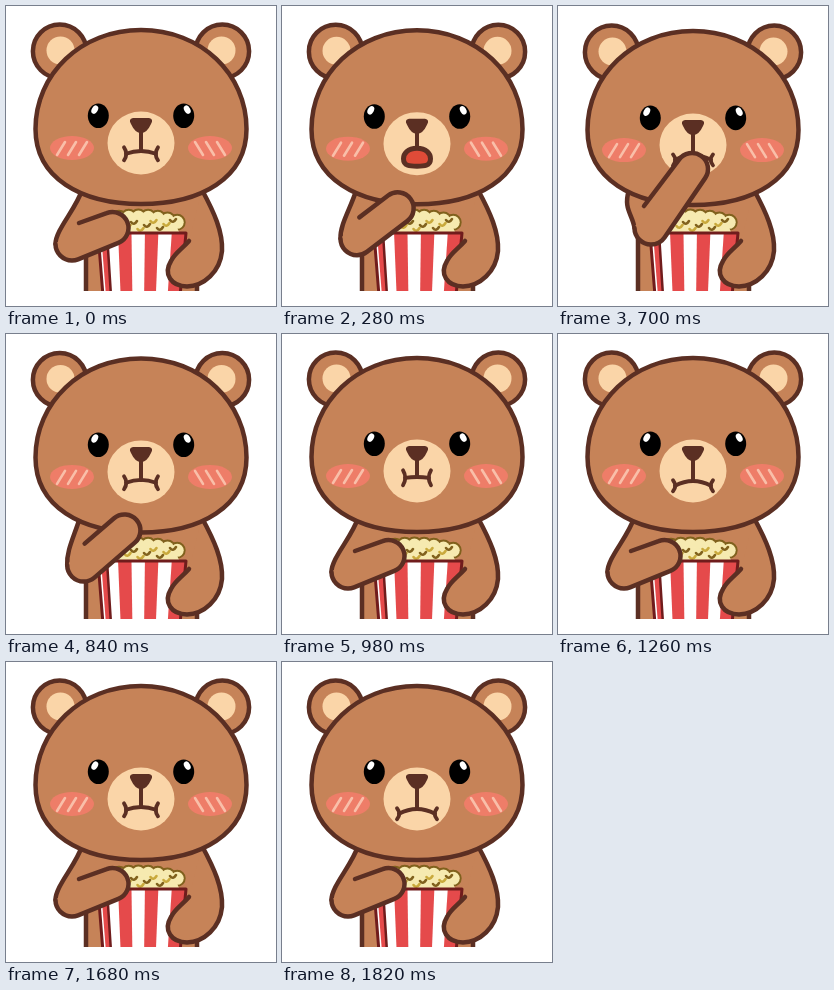
These frames come from a looping animation (270 by 300 pixels, 1960 ms). An HTML page with a canvas:

```html
<!DOCTYPE html>
<html lang="en">
<head>
<meta charset="utf-8">
<title>Bear eating popcorn</title>
<style>
html, body { margin: 0; width: 100%; height: 100%; overflow: hidden; background: #fff; }
canvas { display: block; width: 270px; height: 300px; }
</style>
</head>
<body>
<canvas id="stage"></canvas>
<script>
const canvas = document.getElementById('stage');
const ctx = canvas.getContext('2d');
const ratio = window.devicePixelRatio || 1;
canvas.width = 270 * ratio;
canvas.height = 300 * ratio;

const STEP = 140, STEPS = 14;
const FUR = '#c68358', LINE = '#5b2f23', CREAM = '#fad5a8', RED = '#e54a4b', MAROON = '#701c1c';

const lerp = (a, b, k) => a + (b - a) * k;
const clamp = (v, lo, hi) => Math.min(hi, Math.max(lo, v));

function paint(path, fill, stroke, width = 4.5) {
  if (fill) { ctx.fillStyle = fill; ctx.fill(path); }
  if (stroke) { ctx.strokeStyle = stroke; ctx.lineWidth = width; ctx.stroke(path); }
}
const shape = (d, fill, stroke, width) => paint(new Path2D(d), fill, stroke, width);

function oval(x, y, rx, ry, fill, stroke, width, turn = 0) {
  const path = new Path2D();
  path.ellipse(x, y, rx, ry, turn, 0, Math.PI * 2);
  paint(path, fill, stroke, width);
}

function mirrored(draw) {
  draw();
  ctx.save();
  ctx.translate(270, 0);
  ctx.scale(-1, 1);
  draw();
  ctx.restore();
}

// Raise and lower the hand, open wide, then chew; the eyes close once.
function pose(step) {
  return {
    lift: step < 6 ? clamp(step - 1, 0, 3) : step === 6 ? 1.3 : 0,
    gape: step < 5 ? Math.min(step, 3) : 0,
    chew: Math.sin(step * Math.PI / 2),
    shut: step === 10 || step === 11
  };
}

function drawBody() {
  shape('M76 180 L80 290 L191 290 L196 180 Z', FUR);
  shape('M80 225 L80 290 M191 262 L191 290', null, LINE);
}

function drawPopcorn() {
  const kernels = Array.from({ length: 7 }, (_, i) => {
    const x = 113 + i * 9.7;
    return [x, 211 + ((x - 132) / 17) ** 2];
  });
  for (const [x, y] of kernels) oval(x, y, 6.5, 6.5, '#f6eab0', '#80611d', 4);
  for (const [x, y] of kernels) oval(x, y, 6.5, 6.5, '#f6eab0');
  shape('M110 213 L168 215 L174 228 L106 228 Z', '#f6eab0');
  for (let i = 0; i < 9; i++) {
    const x = 115 + i * 6.5, y = 213 + (i * 7) % 11;
    shape(`M${x - 3} ${y} q3 4 6 -1`, null, i % 2 ? '#c9a93c' : '#80611d', 2.6);
  }
}

function drawBucket() {
  drawPopcorn();
  const stripe = (a, b) => shape(`M${101 + 79 * a} 227 L${101 + 79 * b} 227 L${105 + 69 * b} 290 L${105 + 69 * a} 290 Z`, RED);
  shape('M92 227 L180 227 L174 290 L97 290 Z', '#fff');
  shape('M95 227 L101 227 L105 290 L100 290 Z', RED);
  for (let i = 0; i < 3; i++) stripe(0.14 + i * 0.34, 0.31 + i * 0.34);
  shape('M101 227 L105 290', null, MAROON, 2.5);
  shape('M92 227 L180 227 L174 290 L97 290 Z', null, MAROON, 3);
}

function drawRightArm() {
  shape('M196 184 C208 206 217 226 216 245 C214 266 198 280 181 280.5 C165 280 157 268 165 255 C169 247 175 244 183 235', FUR, LINE);
}

// Upper arm goes behind the head, forearm in front of it.
function drawLeftArm(lift, front) {
  const k = lift / 3, r = 16.5;
  const elbow = { x: lerp(66, 93, k), y: lerp(238, 222, k) };
  const hand = { x: lerp(106.5, 134, k), y: lerp(222, 163, k) };
  const angle = Math.atan2(hand.y - elbow.y, hand.x - elbow.x), side = Math.PI / 2;
  const path = new Path2D();
  if (front) {
    path.arc(elbow.x, elbow.y, r, Math.PI, angle + side, true);
    path.arc(hand.x, hand.y, r - 0.5, angle + side, angle - side, true);
    path.lineTo(lerp(73, 86, k), lerp(217, 200, k));
  } else {
    const x = lerp(76, 71, k), left = elbow.x - r;
    path.moveTo(x, 184);
    path.bezierCurveTo(x - 6, 203, left - 2 * k, elbow.y - 14, left, elbow.y);
    path.lineTo(elbow.x, elbow.y);
    path.lineTo(100, 184);
    paint(path, FUR);
    const outer = new Path2D();
    outer.moveTo(x, 184);
    outer.bezierCurveTo(x - 6, 203, left - 2 * k, elbow.y - 14, left, elbow.y);
    return paint(outer, null, LINE);
  }
  paint(path, FUR, LINE);
}

function drawSkull() {
  mirrored(() => {
    oval(53.7, 45.3, 26.8, 26.8, FUR, LINE);
    oval(54.5, 44.5, 14, 14, CREAM);
  });
  shape('M135 24 C195 24 240.5 68 240.5 123 C240.5 172 195 198 135 198 C75 198 29.5 172 29.5 123 C29.5 68 75 24 135 24 Z', FUR, LINE);
}

function drawFace(shut) {
  mirrored(() => {
    oval(66, 142, 22, 12, '#ee7d68');
    for (let i = -1; i < 2; i++) {
      const x = 66 + i * 11;
      shape(`M${x - 4} 149 L${x + 4} 136`, null, '#f9bfa9', 2.6);
    }
    if (shut) shape('M82 108.5 L103 108.5', null, '#000', 5.5);
    else {
      oval(92.3, 109.8, 10.5, 12.3, '#000');
      oval(88.8, 103.6, 3, 4.5, '#fff', null, 0, 0.5);
    }
  });
  oval(135, 137, 33.5, 31.5, CREAM);
}

function drawOpenMouth(gape) {
  const half = 7.5 + 3 * gape, top = 141.5, bottom = 152.5 + 3.5 * gape;
  const mid = lerp(top, bottom, 0.58);
  const path = new Path2D(`M0 ${top} C${half * 0.7} ${top} ${half} ${mid - 5} ${half} ${mid} C${half} ${bottom} ${half * 0.5} ${bottom} 0 ${bottom}
    C${-half * 0.5} ${bottom} ${-half} ${bottom} ${-half} ${mid} C${-half} ${mid - 5} ${-half * 0.7} ${top} 0 ${top} Z`);
  ctx.save();
  ctx.translate(135, 0);
  paint(path, '#df4b38', LINE, 5);
  ctx.restore();
}

function drawChewing(chew) {
  const half = 15 + 3 * chew, y = 145 + 2 * chew, end = y + 2.8 + 2 * chew, tick = 6.5 - chew;
  mirrored(() => {
    const x = 135 - half;
    shape(`M135 ${y} Q${135 - half / 2} ${y} ${x} ${end}`, null, LINE, 3.8);
    shape(`M${x - 2} ${end - tick} Q${x + 2.5} ${end} ${x - 2} ${end + tick}`, null, LINE, 3.8);
  });
}

function drawMuzzle(gape, chew) {
  if (gape) drawOpenMouth(gape);
  else drawChewing(chew);
  shape(`M135 122 L135 ${gape ? 141 : 145 + 2 * chew}`, null, LINE, 4);
  shape('M127 112 L143 112 Q148 113 145 118 Q141 127 135 127 Q129 127 125 118 Q122 113 127 112 Z', LINE);
}

function draw(now) {
  const { lift, gape, chew, shut } = pose(Math.floor(now / STEP) % STEPS);
  ctx.setTransform(ratio, 0, 0, ratio, 0, 0);
  ctx.fillStyle = '#fff';
  ctx.fillRect(0, 0, 270, 300);
  ctx.lineCap = ctx.lineJoin = 'round';
  ctx.save();
  ctx.beginPath();
  ctx.rect(0, 0, 270, 285);
  ctx.clip();
  drawBody();
  drawLeftArm(lift, false);
  drawBucket();
  drawRightArm();
  // The head nods a little as the hand comes up.
  ctx.save();
  ctx.translate(0, lift * 0.35);
  drawSkull();
  ctx.translate(0, lift * 0.35);
  drawFace(shut);
  drawMuzzle(gape, chew);
  ctx.restore();
  drawLeftArm(lift, true);
  ctx.restore();
}

const start = performance.now();
function tick() {
  draw(performance.now() - start);
  requestAnimationFrame(tick);
}
tick();
</script>
</body>
</html>
```
